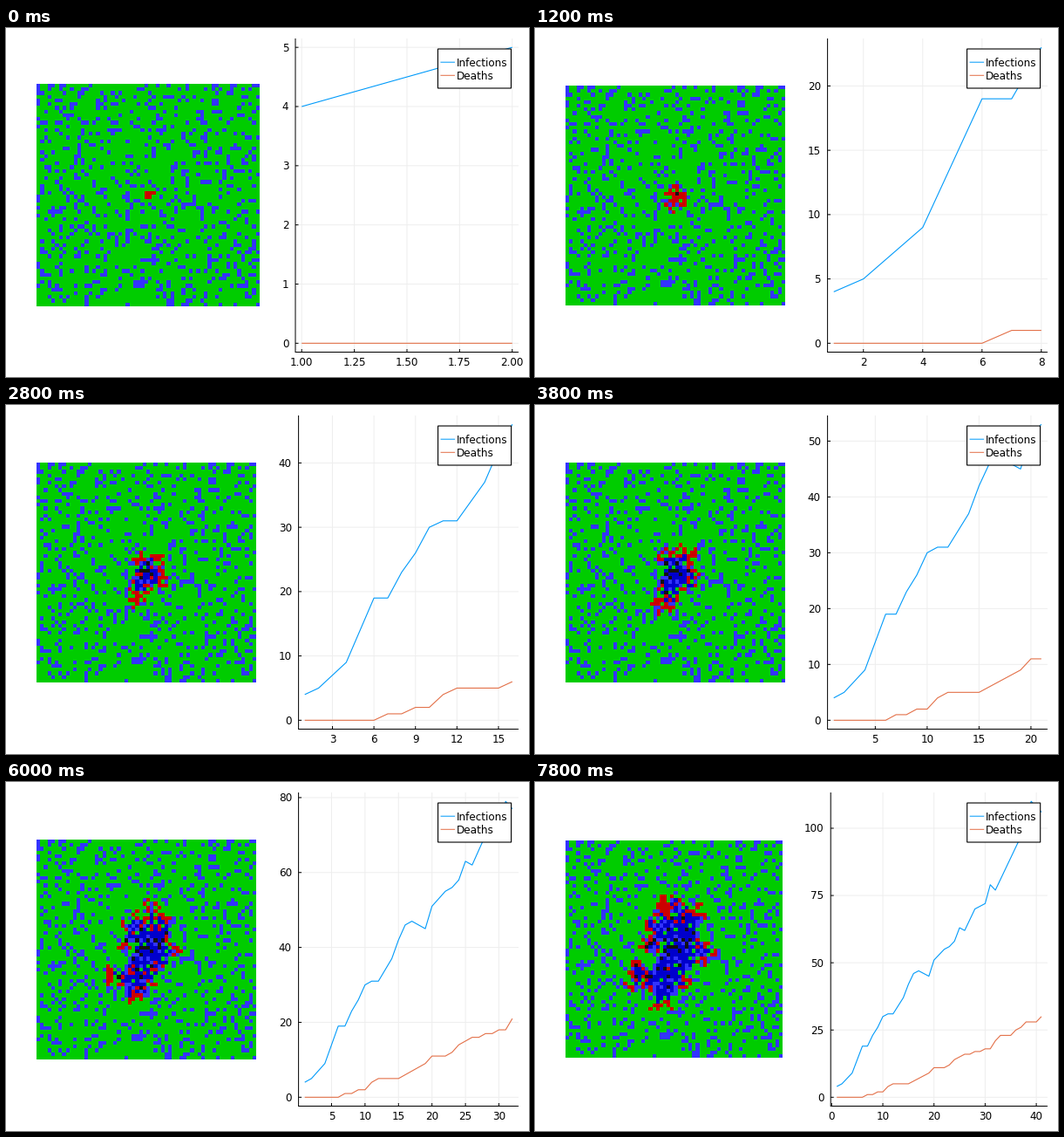
A matplotlib script for the animation above (8000 ms loop, 600 by 400 pixels).

```python
import math
import numpy as np
import matplotlib.pyplot as plt
from matplotlib.animation import FuncAnimation
from matplotlib.colors import ListedColormap
from matplotlib.patches import Rectangle

W, H, FRAMES, GRID = 600, 400, 40, 60
TOP, BOTTOM, RIGHT = 12, 371.5, 588
EM = 12
BLUE, ORANGE = "#009afa", "#e36f47"
CELLS = ListedColormap(["#00cc00", "#3333ff", "#cc0000", "#0000cc", "#111111"])
SUSCEPTIBLE, IMMUNE, SICK, RECOVERED, DEAD = range(5)

days = np.arange(1, FRAMES + 2)


def counts(*knots):
    """Whole daily counts along straight runs between a few turning points."""
    xs, ys = zip(*knots)
    return np.floor(np.interp(days, xs, ys) + 0.5).astype(int)


infections = counts((1, 4), (2, 5), (4, 9), (6, 19), (7, 19), (10, 30), (12, 31),
                    (14, 37), (16, 46), (17, 47), (19, 45), (20, 51), (24, 58),
                    (25, 63), (26, 62), (28, 70), (30, 72), (31, 79), (32, 77),
                    (37, 97), (39, 110), (41, 106))
deaths = counts((6, 0), (7, 1), (10, 2), (12, 5), (15, 5), (19, 9), (20, 11),
                (22, 11), (25, 15), (31, 18), (33, 23), (35, 23), (38, 28),
                (40, 28), (41, 30))
removed = np.maximum(deaths, np.maximum(days - 7, 0) ** 1.5).astype(int)


def near(mask):
    """Cells that touch the mask, diagonals included."""
    wide = mask | np.roll(mask, 1, 0) | np.roll(mask, -1, 0)
    return wide | np.roll(wide, 1, 1) | np.roll(wide, -1, 1)


def simulate(seed=11):
    rng = np.random.default_rng(seed)
    cells = np.where(rng.random((GRID, GRID)) < 0.19, IMMUNE, SUSCEPTIBLE)
    mid = GRID // 2
    sick = [(mid - 1, mid), (mid - 1, mid - 1), (mid, mid - 1), (mid, mid)]
    for cell in sick:
        cells[cell] = SICK
    states = [cells.copy()]
    for i in range(1, len(days)):
        leaving = removed[i] - removed[i - 1]
        dying = deaths[i] - deaths[i - 1]
        fresh = infections[i] - infections[i - 1] + leaving
        options = np.argwhere(near(cells == SICK) & (cells == SUSCEPTIBLE))
        caught = [tuple(c) for c in rng.permutation(options)[:max(fresh, 0)]]
        gone, sick = sick[:leaving], sick[leaving:] + caught
        for j, cell in enumerate(gone):
            cells[cell] = DEAD if j < dying else RECOVERED
        for cell in caught:
            cells[cell] = SICK
        states.append(cells.copy())
    return states


states = simulate()


def nice_ticks(lo, hi):
    """Four to eight ticks, scored by count, coverage and roundness of step."""
    best, ticks, digits = -1, [], 0
    span = hi - lo
    for z in range(2, -3, -1):
        for q, nice in ((5, .9), (3, .2), (2.5, .5), (2, .7), (1, 1)):
            step = q * 10.0 ** z
            first, last = math.ceil(lo / step - 1e-9), math.floor(hi / step + 1e-9)
            k = last - first + 1
            if not 4 <= k <= 8:
                continue
            score = (1 - abs(k - 5) / 5) / 4 + nice / 4
            score += 0.5 * span / ((k - 1) * step)
            score += (math.floor(lo / step) <= 0) / 6
            if score > best + 1e-9:
                best = score
                ticks = [i * step for i in range(first, last + 1)]
                digits = next(d for d in range(4)
                              if abs(step * 10 ** d - round(step * 10 ** d)) < 1e-9)
    return ticks, [f"{t:.{digits}f}" for t in ticks]


def padded(lo, hi):
    pad = 0.03 * (hi - lo)
    return lo - pad, hi + pad


def label_width(s):
    return EM * sum(0.3 if ch == "." else 0.6 for ch in s)


fig = plt.figure(figsize=(6, 4), dpi=100, facecolor="white")
ax = fig.add_axes([0, 0, 1, 1])


def line(xs, ys, color="black", width=1.0, z=2):
    ax.plot(xs, ys, color=color, lw=width * 0.72, zorder=z, snap=False,
            solid_joinstyle="round", solid_capstyle="butt")


def label(x, y, s, ha="center", z=3):
    ax.text(x, y, s, ha=ha, va="baseline", fontsize=EM * 0.72,
            family="DejaVu Sans", color="black", zorder=z)


def draw_legend(left):
    x = RIGHT - (RIGHT - left) / 30 - 84
    ax.add_patch(Rectangle((x, 24), 84, 45, fc="white", ec="black",
                           lw=0.8, zorder=5, snap=False))
    for y, color, name in ((39.2, BLUE, "Infections"), (54.3, ORANGE, "Deaths")):
        line([x + 3, x + 19.5], [y, y], color, z=6)
        label(x + 21, y + 4.4, name, "left", 6)


def draw_chart(n, left, ylim, yticks, ynames):
    xlim = padded(1, n)

    def px(x):
        return left + (np.asarray(x) - xlim[0]) / (xlim[1] - xlim[0]) * (RIGHT - left)

    def py(y):
        return BOTTOM - (np.asarray(y) - ylim[0]) / (ylim[1] - ylim[0]) * (BOTTOM - TOP)

    for t, name in zip(*nice_ticks(*xlim)):
        x = px(t)
        line([x, x], [TOP, BOTTOM], "#eeeeee", z=1)
        line([x, x], [BOTTOM - 3.5, BOTTOM])
        label(x, 387, name)
    for t, name in zip(yticks, ynames):
        y = py(t)
        line([left, RIGHT], [y, y], "#eeeeee", z=1)
        line([left, left + 3.5], [y, y])
        label(left - 7.7, y + 4.4, name, "right")
    line([left, left], [TOP, BOTTOM + 0.5])
    line([left, RIGHT], [BOTTOM, BOTTOM])
    line(px(days[:n]), py(infections[:n]), BLUE, 1.1, 4)
    line(px(days[:n]), py(deaths[:n]), ORANGE, 1.1, 4)


def draw_grid(n, size):
    x, y = 35.4, 191.6
    extent = np.round([x, x + size, y + size / 2, y - size / 2])
    ax.imshow(states[n - 1], cmap=CELLS, vmin=0, vmax=4, extent=extent,
              interpolation="nearest", aspect="auto")


def update(k):
    n = k + 2
    ax.clear()
    ax.axis("off")
    ylim = padded(0, max(infections[:n]))
    ticks, names = nice_ticks(*ylim)
    # Both panels give up half of the extra label width
    shift = (max(map(label_width, names)) - label_width("0")) / 2
    left = 332 + shift
    draw_grid(n, 255.4 - shift)
    draw_chart(n, left, ylim, ticks, names)
    draw_legend(left)
    ax.set_xlim(0, W)
    ax.set_ylim(H, 0)
    return []


anim = FuncAnimation(fig, update, frames=FRAMES, interval=200, repeat=True,
                     repeat_delay=0, blit=False)
plt.show()
```
